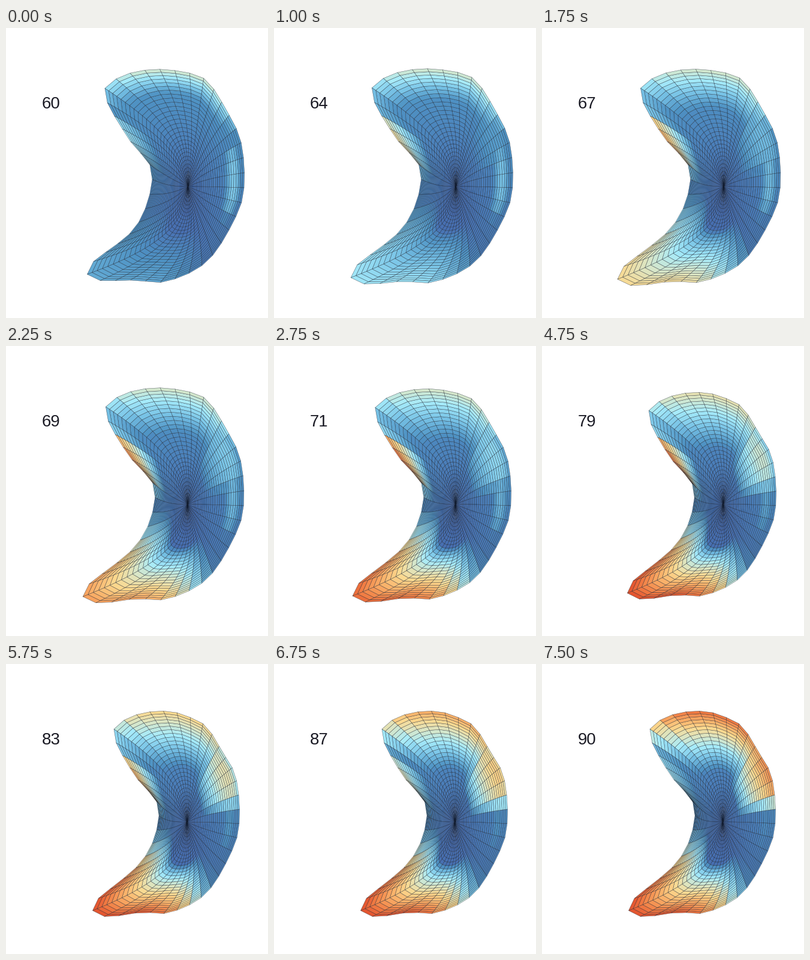
These frames come from a looping animation (437 by 483 pixels, 7750 ms). A matplotlib script:

```python
import numpy as np
import matplotlib.pyplot as plt
from matplotlib.animation import FuncAnimation
from matplotlib.collections import PolyCollection
from matplotlib.colors import LinearSegmentedColormap

W, H, DPI = 437, 483, 64
PX = 72 / DPI
FRAMES, INTERVAL = 31, 250
SPOKES, RINGS = 44, 30

CMAP = LinearSegmentedColormap.from_list("heat", [
    "#4668ae", "#4f93c4", "#78c3e6", "#a6ebfa", "#d8e6c8",
    "#fbd98f", "#f9ad66", "#f07a42", "#dc3d24"])

# Outline of the crescent, counter-clockwise from the right
OUTLINE = np.array([
    (397, 266), (392, 190), (367, 136), (334, 87), (295, 73), (245, 69),
    (197, 79), (164, 108), (205, 185), (242, 233), (236, 290), (208, 341),
    (140, 395), (148, 419), (215, 420), (268, 422), (335, 389), (381, 319)],
    float)


def smooth(x):
    x = np.clip(x, 0, 1)
    return x * x * (3 - 2 * x)


def closed_curve(points, steps=40):
    """Dense Catmull-Rom curve through the points."""
    u = np.linspace(0, 1, steps, endpoint=False)[:, None, None]
    a, b, c, d = (np.roll(points, n, axis=0) for n in (1, 0, -1, -2))
    curve = b + .5 * u * (c - a + u * (2 * a - 5 * b + 4 * c - d
                                       + u * (3 * (b - c) + d - a)))
    curve = curve.swapaxes(0, 1).reshape(-1, 2)
    return np.vstack([curve, points[:1]])


def even_points(curve, n):
    """n points at equal distances along a closed curve."""
    steps = np.hypot(*np.diff(curve, axis=0).T)
    dist = np.concatenate([[0], np.cumsum(steps)])
    at = np.arange(n) * dist[-1] / n
    return np.stack([np.interp(at, dist, axis) for axis in curve.T], axis=1)


def bump(spoke, centre, width):
    """Flat-topped bump around the rim."""
    d = (spoke - centre + SPOKES / 2) % SPOKES - SPOKES / 2
    return np.exp(-(d / width) ** 4)


RIM = even_points(closed_curve(OUTLINE), SPOKES)
spoke = np.arange(SPOKES)
phi = 2 * np.pi * spoke / SPOKES

s = np.linspace(0, 1, RINGS + 1)
t = (1.25 * s - .25 * s ** 3)[:, None, None]

cell = spoke + .5
depth = ((np.arange(RINGS) + .5) / RINGS)[:, None]


def rim_at(i):
    """The rim shrinks while the lower arm stretches out."""
    shrink = 1.15 * smooth((i - 3) / 20) - .15 * smooth(i / 6)
    stretch = smooth(i / 7)
    rim = RIM + shrink * (np.array([316, 260]) - RIM) * [.1, .05]
    for centre, width, move in (
            (30, 3, np.array([-9, 8]) * stretch),
            (22, 3, np.array([4, 0]) * stretch),
            (7, 2.5, np.array([0, 7]) * shrink)):
        rim = rim + bump(spoke, centre, width)[:, None] * move
    return rim


def mesh(i):
    """Quads between ellipses at the pole that widen into the rim."""
    pole = np.array([303.5, 264]) - np.array([2, 1]) * i / (FRAMES - 1)
    oval = np.stack([50 * np.cos(phi), -150 * np.sin(phi)], axis=1)
    grid = pole + oval * t + (rim_at(i) - pole - oval) * t ** 3
    side = np.roll(grid, -1, axis=1)
    quads = np.stack([grid[:-1], grid[1:], side[1:], side[:-1]], axis=2)
    return quads.reshape(-1, 4, 2)


def patch(centre, width, onset, power, peak):
    """Warm patch that rises from a given depth towards the rim."""
    rise = np.clip((depth - onset) / (1 - onset), 0, 1) ** power
    return peak * rise * bump(cell, centre, width)


def heat(i):
    p = i / (FRAMES - 1)
    base = .1 + depth * (.7 + .5 * np.sin(2 * np.pi * cell / SPOKES))
    arm = patch(31, 7, .4, .6, 1.5 + 6.2 * smooth(i / 13))
    fold = patch(19, 2.5, .55, .8, 3 + 4.5 * np.sin(np.pi * p))
    crown = patch(10, 6, .7 - .3 * smooth(i / 15), 1, 4 + 3.2 * p ** 4)
    shoulder = patch(4, 2.9, .35, .6, 6.6 * p ** .7)
    shoulder = shoulder * (1 - .7 * (1 - p ** 4) * depth ** 12)
    flank = 2.2 * bump(cell, .5, 3) * np.exp(-((depth - .83) / .12) ** 2)
    warm = np.maximum.reduce([base, arm, fold, crown, shoulder,
                              flank * (1 - .6 * p)])
    return warm.ravel()


fig = plt.figure(figsize=(W / DPI, H / DPI), dpi=DPI, facecolor="white")
ax = fig.add_axes([0, 0, 1, 1])
ax.set_xlim(0, W)
ax.set_ylim(H, 0)
ax.axis("off")

surface = PolyCollection(mesh(0), cmap=CMAP, edgecolors=(.05, .08, .13, .65),
                         linewidths=.5 * PX)
surface.set_clim(0, 8)
ax.add_collection(surface, autolim=False)
label = ax.text(59.5, 134.5, "", family="Liberation Sans", size=27.6 * PX,
                color="#1a1a24", va="baseline")


def draw(i):
    surface.set_verts(mesh(i))
    surface.set_array(heat(i))
    label.set_text(str(60 + i))
    return surface, label


anim = FuncAnimation(fig, draw, frames=FRAMES, interval=INTERVAL,
                     init_func=lambda: draw(0), repeat=True, repeat_delay=0)
plt.show()
```
